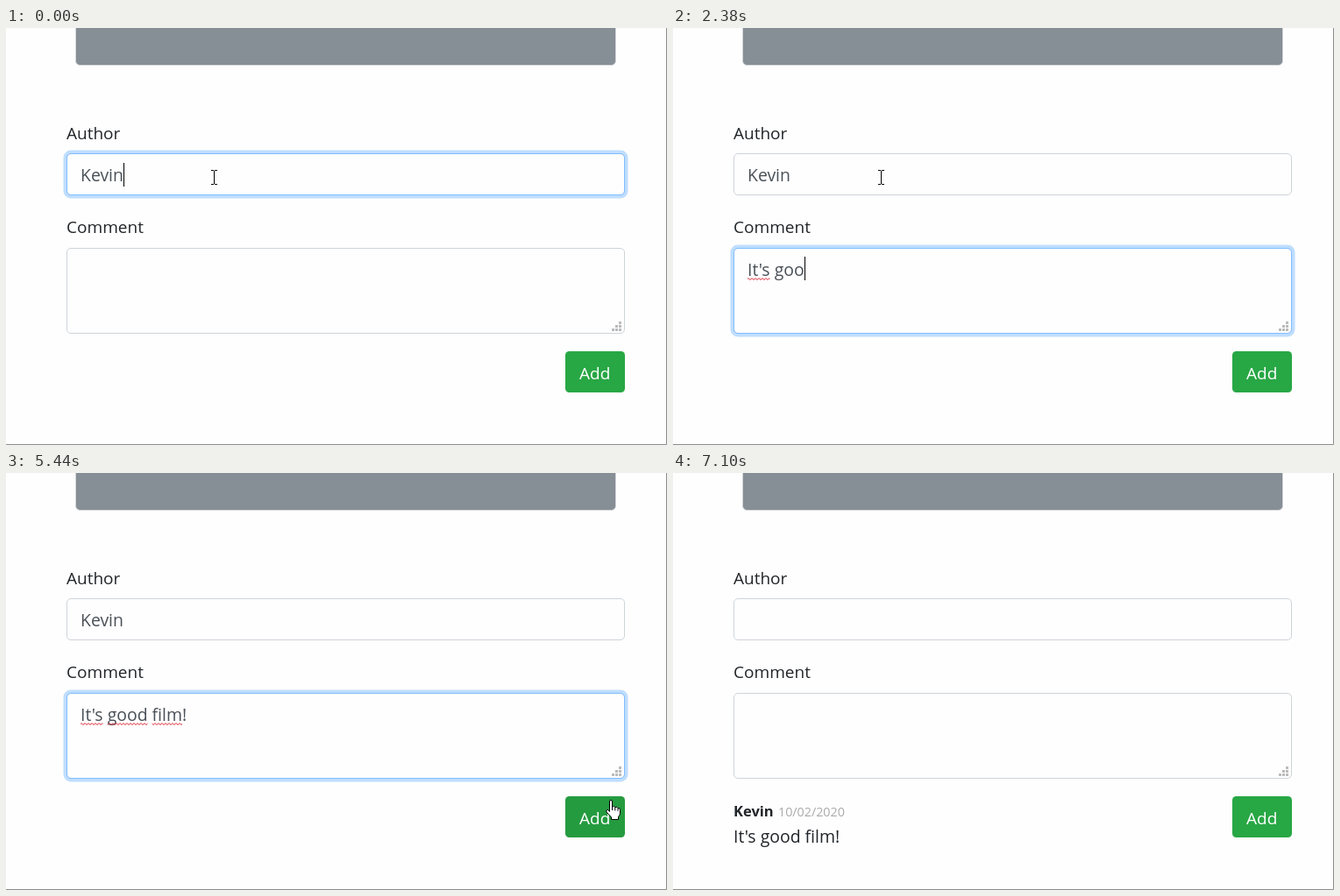
An HTML page for the animation above (7.5 s loop, 754x476 px).

```html
<!DOCTYPE html>
<html lang="en">
<head>
<meta charset="utf-8">
<title>Comment form</title>
<style>
html, body { margin: 0; width: 100%; height: 100%; overflow: hidden; background: #fefefe; }
svg { display: block; }
text { font: 19px "Open Sans", "Noto Sans", sans-serif; fill: #212529; white-space: pre; }
.value { font-size: 19.4px; }
.input { fill: #495057; }
.name { font-size: 16.5px; font-weight: 700; }
.date { font-size: 14.3px; fill: #aaa; }
.field { --g: 0; fill: none; }
.field .glow { stroke: #007bff; stroke-width: calc(var(--g) * 8px); stroke-opacity: calc(var(--g) * .25); }
.field .box { fill: #fefefe; stroke: #ced4da; }
.field .focus { stroke: #80bdff; opacity: var(--g); }
</style>
</head>
<body>
<svg width="754" height="476" viewBox="0 0 754 476">
  <defs>
    <pattern id="wave" width="4" height="4" y="285" patternUnits="userSpaceOnUse">
      <path d="M-1 3.5L2 .5L5 3.5" fill="none" stroke="#d8222f"/>
    </pattern>
  </defs>
  <rect width="754" height="476" fill="#fefefe"/>
  <path d="M753.5 0V475.5H0" fill="none" stroke="#8c8c8c"/>
  <rect x="79.5" y="-9.5" width="616" height="52" rx="5" fill="#868e96" stroke="#d5d7d9"/>

  <text x="69" y="127">Author</text>
  <g class="field" id="authorField"></g>
  <text class="value input" id="author" x="85" y="175">Kevin</text>

  <text x="69" y="234">Comment</text>
  <g class="field" id="commentField"></g>
  <path d="M699 335h3v3h-3zm-4 4h3v3h-3zm4 0h3v3h-3zm-8 4h3v3h-3zm4 0h3v3h-3zm4 0h3v3h-3z" fill="#bbb"/>
  <text class="value input" id="comment" x="85" y="283"></text>
  <g id="waves" fill="url(#wave)"></g>
  <rect id="caret" width="1" height="27"/>

  <g id="post">
    <text class="name" x="69" y="392">Kevin</text>
    <text class="date" x="120" y="392">10/02/2020</text>
    <text class="value" id="posted" x="69" y="422">It's good film!</text>
  </g>

  <rect id="button" x="638" y="369" width="68" height="47" rx="4.5"/>
  <text x="654" y="401" style="fill:#fff">Add</text>

  <!-- pointer shapes, each with its hot spot at 0,0 -->
  <g id="pointers">
    <path id="beam" d="M-3 -7.5h3M1 -7.5h3M.5 -7V8M-3 8.5h3M1 8.5h3" fill="none" stroke="#000"/>
    <path id="arrow" d="M.5 .5V16.5L4.2 13L6.7 18.5L9 17.5L6.5 12H11.5Z" fill="#fff" stroke="#000"/>
    <path id="hand" d="M-1.5 2Q-1.5 .5 0 .5T1.5 2V8Q4 6.8 4.8 8.6Q7.2 7.6 8 9.6Q10.5 9 10.5 11.5V15Q10.5 17.5 8.5 19.5V22.5H.5V20L-5 14Q-6 11.5 -3.7 11.3L-1.5 13.5ZM1.5 8v4M4.8 8.6v3.9M8 9.6v3.2" fill="#fff" stroke="#000"/>
  </g>
</svg>
<script>
const LOOP = 7500;
const el = id => document.getElementById(id);
const posted = el('posted');
const message = posted.textContent;

// Each track lists [start time, value]; a value holds until the next start.
const tracks = {
  authorGlow: [[0, 1], [150, .35], [270, 0]],
  commentGlow: [[0, 0], [150, .5], [270, .85], [420, 1], [5590, .5], [5740, 0]],
  typed: [[0, 0], [700, 1], [970, 2], [1090, 3], [1220, 4], [1650, 5], [2070, 6], [2230, 7],
    [2380, 8], [2530, 10], [2800, 11], [2920, 12], [3080, 13], [3380, 14], [3780, 15], [5740, 0]],
  checked: [[0, 0], [1650, 1], [2530, 2], [3900, 3], [5740, 0]],
  caret: [[0, 1], [1800, 0], [2070, 1], [4360, 0], [4910, 1], [5440, 0]],
  button: [[0, '#28a745'], [5440, '#259b40'], [5590, '#1e7e34'], [5740, '#28a745'],
    [5890, '#218838'], [7100, '#28a745']],
  pointer: [[0, ['beam', 237, 170]], [4760, ['arrow', 367, 211]], [4910, ['beam', 478, 269]],
    [5040, ['beam', 574, 318]], [5160, ['beam', 632, 346]], [5310, ['hand', 690, 390]],
    [5440, ['hand', 690, 373]], [6830, ['hand', 691, 390]], [6950, ['arrow', 681, 454]],
    [7100, ['none', 0, 0]]]
};
const at = (name, t) => tracks[name].findLast(([start]) => t >= start)[1];
const advance = n => n ? posted.getSubStringLength(0, n) : 0;

function makeField(id, y, height) {
  el(id).innerHTML = ['glow', 'box', 'focus'].map(part =>
    `<rect class="${part}" x="69.5" y="${y}" width="636" height="${height}" rx="4.5"/>`).join('');
}
makeField('authorField', 143.5, 47);
makeField('commentField', 251.5, 97);

const words = [...message.matchAll(/[\w']+/g)];

function drawWaves(count) {
  el('waves').innerHTML = words.slice(0, count).map(({ 0: word, index }) => {
    const left = advance(index), right = advance(index + word.length);
    return `<rect x="${85 + left}" y="285" width="${right - left}" height="4"/>`;
  }).join('');
}

function draw(now) {
  const t = now % LOOP;
  const typed = at('typed', t);
  const sent = t >= 5740;

  el('authorField').style.setProperty('--g', at('authorGlow', t));
  el('commentField').style.setProperty('--g', at('commentGlow', t));
  el('author').style.visibility = sent ? 'hidden' : 'visible';
  el('post').style.visibility = sent ? 'visible' : 'hidden';
  el('comment').textContent = message.slice(0, typed);
  drawWaves(at('checked', t));

  const inAuthor = t < 150;
  const caret = el('caret');
  caret.setAttribute('x', inAuthor ? 134 : 85 + Math.round(advance(typed)));
  caret.setAttribute('y', inAuthor ? 154 : 261);
  caret.style.opacity = at('caret', t);

  el('button').setAttribute('fill', at('button', t));
  const [shape, x, y] = at('pointer', t);
  el('pointers').setAttribute('transform', `translate(${x} ${y})`);
  for (const id of ['beam', 'arrow', 'hand']) el(id).style.display = id === shape ? '' : 'none';

  requestAnimationFrame(draw);
}
requestAnimationFrame(draw);
</script>
</body>
</html>
```
